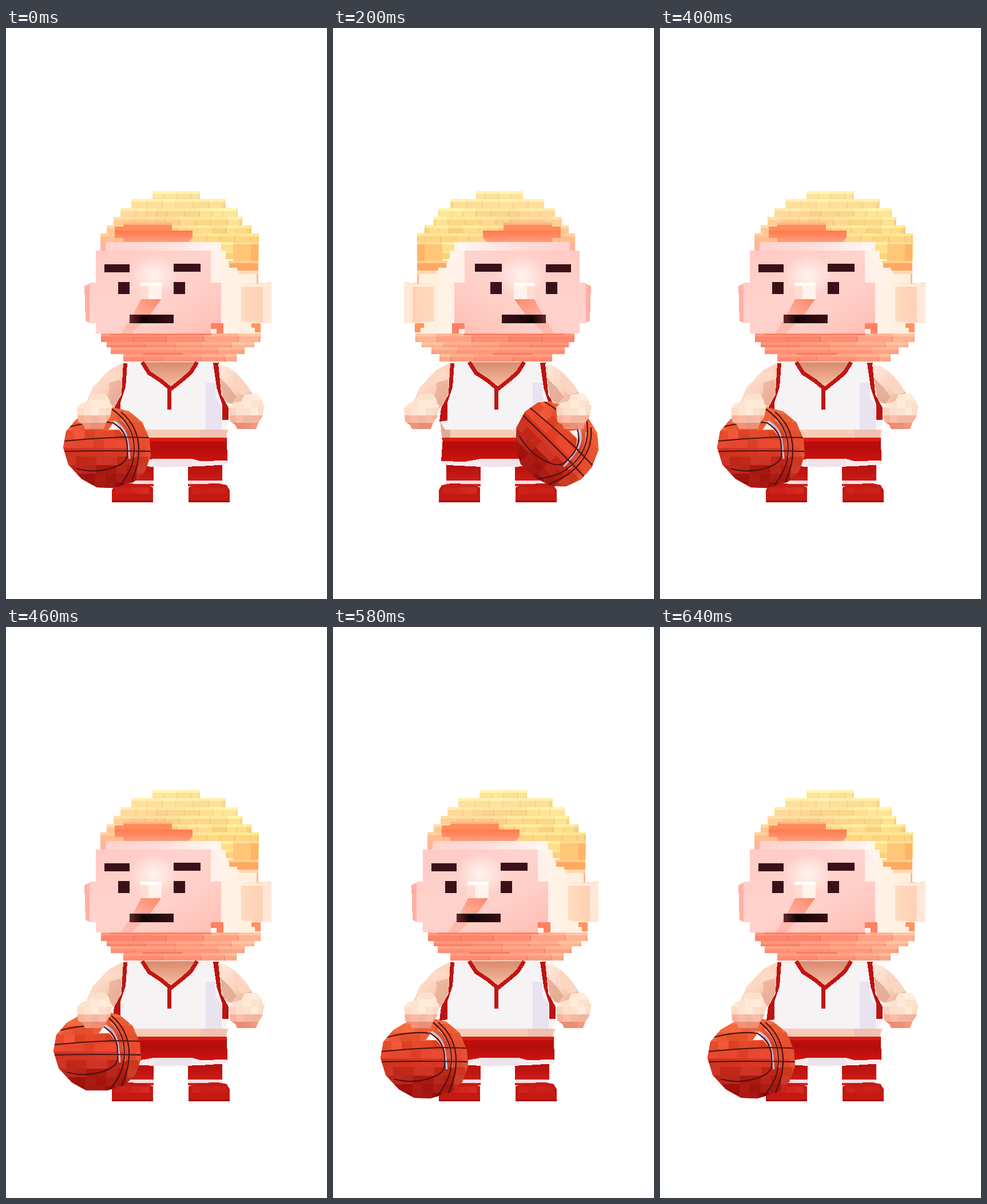
Recreate the animation shown at these times as an HTML page. Size 561 by 998 pixels, loop 0.67 s.

```html
<!DOCTYPE html>
<html lang="en">
<head>
<meta charset="utf-8">
<title>Dribble</title>
<style>
  html, body { margin: 0; width: 100%; height: 100%; overflow: hidden; background: #fff; }
  svg { display: block; width: 100%; height: 100%; }
</style>
</head>
<body>
<svg viewBox="0 0 561 998" shape-rendering="crispEdges">
  <defs>
    <linearGradient id="face" x1="0" y1="0" x2="1" y2="1">
      <stop offset="0" stop-color="#ffc9c4"/><stop offset=".45" stop-color="#ffd3cd"/>
      <stop offset=".7" stop-color="#ffcdc6"/><stop offset="1" stop-color="#ffbdb2"/>
    </linearGradient>
    <linearGradient id="side">
      <stop offset="0" stop-color="#ffe9df"/><stop offset=".5" stop-color="#fffaf3"/><stop offset="1" stop-color="#ffeedc"/>
    </linearGradient>
    <linearGradient id="ear"><stop offset="0" stop-color="#ffdcc0"/><stop offset="1" stop-color="#ffcdb2"/></linearGradient>
    <linearGradient id="brow"><stop offset="0" stop-color="#ffd0cc"/><stop offset=".5" stop-color="#ffddd7"/><stop offset="1" stop-color="#fff8f4"/></linearGradient>
    <linearGradient id="mouth"><stop offset="0" stop-color="#65282a"/><stop offset=".3" stop-color="#140406"/><stop offset="1" stop-color="#3a0f16"/></linearGradient>
    <linearGradient id="shadow" x1="0" x2="0" y1="0" y2="1"><stop offset="0" stop-color="#ff7a4c"/><stop offset="1" stop-color="#ff9c7c"/></linearGradient>
    <linearGradient id="noseShadow" x1="1" x2="0" y1="0" y2="1"><stop offset="0" stop-color="#ff8666"/><stop offset="1" stop-color="#ffb3a4"/></linearGradient>
    <linearGradient id="neck" x1="0" x2="0" y1="0" y2="1"><stop offset="0" stop-color="#d98a6e"/><stop offset="1" stop-color="#f9c3a6"/></linearGradient>
    <linearGradient id="shorts" x1="0" x2="0" y1="0" y2="1"><stop offset="0" stop-color="#c9100c"/><stop offset=".4" stop-color="#b40d0c"/><stop offset="1" stop-color="#cf1510"/></linearGradient>
    <linearGradient id="leg" x1="0" x2="0" y1="0" y2="1"><stop offset="0" stop-color="#b00d0d"/><stop offset="1" stop-color="#d2211a"/></linearGradient>
    <linearGradient id="arm" x1="0" x2="1" y1="0" y2="1"><stop offset="0" stop-color="#ffeadd"/><stop offset=".55" stop-color="#fbd3bd"/><stop offset="1" stop-color="#e3a088"/></linearGradient>
    <radialGradient id="glow"><stop offset="0" stop-color="#fffaf5" stop-opacity=".85"/><stop offset="1" stop-color="#fffaf5" stop-opacity="0"/></radialGradient>
    <clipPath id="ballClip"><path d="M-77 0L-72-28L-54-49L-28-64L6-71L38-63L61-44L74-14L76 14L66 42L47 60L10 71L-18 70L-45 55L-68 30Z"/></clipPath>
    <clipPath id="handClip"><path d="M-31-6L-24-14L-10-18L-4-30L18-31L25-22L28-12L31-10L27 10L20 20L16 31H-17L-20 24L-29 18Z"/></clipPath>
    <clipPath id="floor"><rect id="floorRect" width="561" height="998"/></clipPath>
  </defs>

  <g id="body">
    <g id="legs"></g>
    <path d="M204 584H372L376 640L389 664V690L383 700L388 716L386 757H189L192 722L187 700V684L190 664L202 640Z" fill="#f5f3f4"/>
    <path d="M349 620H366V645L377 660V702H349Z" fill="#e9e3f0"/>
    <path d="M188 702H389L384 717H190Z" fill="#f8cbb5"/>
    <path d="M187 688L196 702H205V717H192Z" fill="#e2aa96"/>
    <path d="M340 702H384V717H340Z" fill="#f0c0b2"/>
    <path d="M204 586H212L209 628L200 655V686L186 688L189 664L202 640Z" fill="#bd1312"/>
    <path d="M362 585H372L376 640L389 664V685H378V658L368 628Z" fill="#bd1312"/>
    <path d="M240 584H332L312 612L288 631L262 612Z" fill="url(#neck)"/>
    <path d="M238 584L250 603L270 616L288 631L308 615L323 602L334 584M285 630V667" fill="none" stroke="#c11615" stroke-width="7"/>
    <path d="M192 716H386L387 757H325L258 754L230 759L189 757Z" fill="url(#shorts)"/>
    <path d="M190 716H385V722H192Z" fill="#d81d13"/>
    <path d="M190 757L230 758L258 753H325L340 757L386 756V763L340 766L280 768L200 764Z" fill="#fbe9ec"/>
    <path d="M258 754H325V766H258Z" fill="#ede3ec"/>
  </g>

  <g clip-path="url(#floor)"><g id="ball" shape-rendering="auto">
    <g clip-path="url(#ballClip)">
      <rect x="-80" y="-75" width="160" height="150" fill="#d63c24"/>
      <g id="facets" shape-rendering="crispEdges"></g>
      <path d="M4-46L23-28L36-12L30-24L17-45Z" fill="#ffb8a4"/>
      <path d="M2-31L13-46L23-31Z" fill="#fff4f2"/>
      <path d="M12-46C34-35 36-18 39 20" fill="none" stroke="#b7c3e4" stroke-width="3"/>
      <path d="M24-50C44-35 48-8 47 18" fill="none" stroke="#e4a6a0" stroke-width="3"/>
      <g fill="none" stroke="#4d1215" stroke-width="2.2">
        <path d="M-76-11Q-25-16 26-18L76-17"/>
        <path d="M-76 7Q0 5 77 7"/>
        <path d="M-66-36Q-22-47 10-43C28-32 35-16 35 0C36 14 36 22 23 30Q-12 48-54 37"/>
        <path d="M8-67C37-47 47-22 47 4S38 46 20 70"/>
        <path d="M24-62C48-42 56-16 55 9S48 42 42 62"/>
      </g>
    </g>
  </g></g>

  <g id="leftArm">
    <path d="M205 585L180 598L151 629L140 655L185 665L192 658L202 638Z" fill="url(#arm)"/>
    <path d="M180 618L200 615L202 638L189 660L176 650L181 632Z" fill="#e9ad96" opacity=".7"/>
    <path d="M170 606L198 599L203 613L176 622Z" fill="#ffdcc8" opacity=".7"/>
    <g class="hand" transform="translate(155 670)"></g>
  </g>
  <g id="rightArm">
    <path d="M371 587L388 592L404 604L418 620L433 643L398 658L384 655L376 637Z" fill="url(#arm)"/>
    <path d="M374 612L390 627L403 645L393 657L380 648Z" fill="#dfa38d" opacity=".75"/>
    <path d="M397 601L417 619L428 637L411 641L397 620Z" fill="#fbd5bf"/>
    <g class="hand" transform="translate(421 670)"></g>
  </g>

  <g id="head">
    <path d="M165 374H441V516H445V545H166V389Z" fill="url(#side)"/>
    <g id="beard"></g>
    <path d="M137 451L146 447V515L139 512Z" fill="#ffb0a6"/>
    <path d="M165 374H368V389H165Z" fill="url(#brow)"/>
    <path d="M157 389H358V445H376V516H358V534H157V516H146V445H157Z" fill="url(#face)"/>
    <path d="M358 389H364L376 412V445H358Z" fill="#fff0ea"/>
    <path d="M376 445H388V516H380L376 520Z" fill="#fff0e8"/>
    <ellipse cx="258" cy="432" rx="42" ry="36" fill="url(#glow)" shape-rendering="auto"/>
    <path d="M236 474L222 501L201 534H220L252 501L270 474Z" fill="#ffa594" opacity=".5"/>
    <path d="M236 474H271L252 501H222Z" fill="url(#noseShadow)"/>
    <path d="M358 516H380V534H368V526H358Z" fill="#ff8062"/>
    <path d="M429 516H445V532H435V524H429Z" fill="#ff9460"/>
    <path d="M407 448L464 445V516L407 513Z" fill="url(#ear)"/>
    <path d="M449 446H464V516H449Z" fill="#ffe8d8"/>
    <path d="M407 448H449V452H411V513H407Z" fill="#fff0de"/>
    <g id="hair"></g>
    <path d="M190 354H326V367L318 374H205V367H190Z" fill="url(#shadow)"/>
    <path d="M190 347H205V340H290V354H190Z" fill="#ff8c5a"/>
    <path d="M205 340H290V344H205Z" fill="#ffb784"/>
    <path d="M397 376H441V407H397Z" fill="#ffc678"/>
    <path d="M428 376H441V407H428Z" fill="#ffb468"/>
    <path d="M397 374H441V378H397Z" fill="#ffdc98"/>
    <path d="M388 407H441V411H388Z" fill="#ffd08c"/>
    <path d="M390 411H441V424H404V419H390Z" fill="#ffa862"/>
    <path d="M407 424H441V430H407Z" fill="#ffd9b0"/>
    <path d="M438 430H441V446H438Z" fill="#ffb88c"/>
    <path d="M172 413H216V427H172ZM293 412H340V426H293ZM196 444H216V465H196ZM293 444H313V465H293Z" fill="#3b1119"/>
    <path d="M235 445H272V474H235Z" fill="#fffdfa"/>
    <path d="M235 451H249V474H235Z" fill="#ffdcd0"/>
    <path d="M249 451H272V474H249Z" fill="#fff3ec"/>
    <path d="M216 501H293V516H216Z" fill="url(#mouth)"/>
    <path id="smile" d="M293 492L303 490V485L313 482V497L303 503L293 508Z" fill="#3b1119"/>
  </g>
</svg>
<script>
const $ = id => document.getElementById(id);
let seed = 7;
const random = () => (seed = seed * 16807 % 2147483647) / 2147483647;
const mix = (a, b, t) => a.map((v, i) => v + (b[i] - v) * Math.max(0, Math.min(1, t)));
const shade = (c, k) => `rgb(${c.map(v => Math.round(Math.max(0, Math.min(255, v + k))))})`;

function rect(parent, x, y, w, h, fill) {
  const el = document.createElementNS('http://www.w3.org/2000/svg', 'rect');
  for (const [key, value] of Object.entries({ x, y, width: w, height: h, fill })) el.setAttribute(key, value);
  parent.append(el);
}

function hairColor(x, y) {
  const across = mix([255, 184, 134], [255, 214, 130], (x - 190) / 150);
  return mix([255, 228, 158], across, (y - 285) / 75);
}

function beardColor(x, y) {
  return mix([255, 138, 112], [255, 186, 150], (x - 270) / 150);
}

// Each row is [top, bottom, left, right], filled with voxel fronts and lit tops.
function voxelRow([top, bottom, left, right], color, parent, size) {
  for (let x = left; x < right;) {
    const w = Math.min(size * (.65 + random() * .6), right - x);
    const c = color(x, top), k = random() * 14 - 7;
    rect(parent, x, top, w + .5, bottom - top, shade(c, k));
    rect(parent, x, top, w, 5, shade(c, k + 18));
    rect(parent, x + w - 2, top + 5, 2, bottom - top - 5, shade(c, k - 12));
    x += w;
  }
}

function buildHead() {
  const hairRows = [[285, 299, 256, 338], [299, 315, 219, 383], [315, 330, 200, 404],
    [330, 345, 188, 412], [345, 359, 176, 428], [359, 374, 165, 441],
    [374, 389, 376, 441], [389, 404, 384, 441]];
  for (const row of hairRows) voxelRow(row, hairColor, $('hair'), 25);
  rect($('hair'), 165, 374, 9, 15, '#ffb496');

  const beardRows = [[534, 549, 166, 444], [549, 558, 176, 433], [558, 570, 183, 416], [570, 583, 205, 402]];
  for (const row of beardRows) voxelRow(row, beardColor, $('beard'), 62);
  rect($('beard'), 183, 534, 176, 3, '#ff7f62');
  rect($('beard'), 239, 568, 70, 3, '#ff7858');
}

function buildBall() {
  for (let y = -74; y < 74; y += 15) {
    for (let x = -80 + random() * 8; x < 80; x += 18) {
      const t = (y + 70) / 120;
      const base = t < .5 ? mix([246, 108, 62], [222, 60, 36], t * 2) : mix([222, 60, 36], [158, 16, 12], t * 2 - 1);
      const c = mix(base, [236, 100, 56], (x - 20) / 110);
      rect($('facets'), x, y, 18.5, 15.5, shade(c, random() * 24 - 12));
    }
  }
}

function buildHands() {
  for (const hand of document.querySelectorAll('.hand')) {
    hand.setAttribute('clip-path', 'url(#handClip)');
    for (let y = -32; y < 32; y += 13)
      for (let x = -32; x < 32; x += 13) {
        const c = mix([255, 230, 210], [232, 112, 86], (y + 4) / 36 + Math.abs(x + 4) / 160);
        rect(hand, x, y, 13.5, 13.5, shade(c, random() * 18 - 9));
      }
  }
}

function buildLegs() {
  for (const [x, width] of [[198, 60], [318, 60]]) {
    rect($('legs'), x, 757, width, 44, 'url(#leg)');
    rect($('legs'), x, 791, width, 6, '#f7dfe5');
  }
  for (const [x, flip] of [[185, 1], [391, -1]]) {
    const shoe = document.createElementNS('http://www.w3.org/2000/svg', 'path');
    shoe.setAttribute('d', 'M0 829V808L5 799L20 796L55 797L72 803V829Z');
    shoe.setAttribute('fill', '#c51914');
    shoe.setAttribute('transform', `translate(${x} 0) scale(${flip} 1)`);
    $('legs').append(shoe);
    const left = Math.min(x, x + flip * 72);
    for (let i = 0; i < 4; i++) rect($('legs'), left + 6 + i * 15, 803, 15, 11, shade([206, 35, 27], random() * 16 - 8));
    rect($('legs'), left, 826, 72, 3, '#a50d0d');
  }
}

const pose = (x, y, turn = 0, extra = {}) => ({ x, y, turn, floor: 998, arm: 0, ...extra });
const held = pose(177, 733);
const down = pose(179, 796, 4, { arm: -5 });
const high = pose(160, 741, 0, { floor: 810 });
const low = pose(160, 753);
const steps = [held, pose(280, 802, 5, { smile: true }), pose(390, 725, 45, { mirror: true }),
  pose(281, 801, -8, { smile: true })];
const dribble = [held, down, high, down, low, down, low, down, low];

function draw(time) {
  const t = time % 670;
  const p = t < 400 ? steps[Math.floor(t / 100)] : dribble[Math.floor((t - 400) / 30)];
  $('ball').setAttribute('transform', `translate(${p.x} ${p.y}) rotate(${p.turn})`);
  $('floorRect').setAttribute('height', p.floor);
  $('leftArm').setAttribute('transform', `rotate(${p.arm} 198 610)`);
  $('head').setAttribute('transform', p.mirror ? 'translate(588 0) scale(-1 1)' : `translate(0 ${p.smile ? 9 : 0})`);
  $('smile').setAttribute('visibility', p.smile ? 'visible' : 'hidden');
}

buildHands();
buildLegs();
buildHead();
buildBall();
const start = performance.now();
function tick() {
  draw(performance.now() - start);
  requestAnimationFrame(tick);
}
tick();
</script>
</body>
</html>
```
